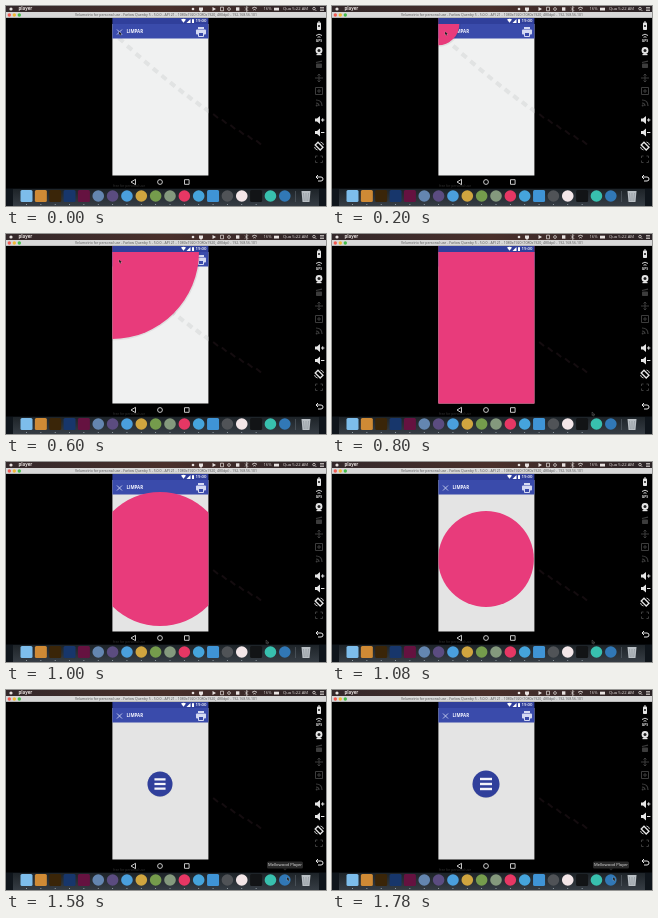
Recreate the animation shown at these times as an HTML page with a canvas. Size 320 by 200 pixels, loop 1.88 s.

```html
<!DOCTYPE html>
<html lang="pt">
<head>
<meta charset="utf-8">
<title>Circular reveal</title>
<style>
html, body { margin: 0; width: 100%; height: 100%; overflow: hidden; background: #000; }
canvas { display: block; width: 320px; height: 200px; }
</style>
</head>
<body>
<canvas id="stage" width="320" height="200"></canvas>
<script>
const g = document.getElementById('stage').getContext('2d');
const LOOP = 1880;
const STEPS = [0, 100, 200, 300, 400, 500, 600, 700, 800, 920, 1000, 1080, 1180,
  1260, 1380, 1480, 1580, 1680, 1780];
const PINK = '#e83b7b', BLUE = '#3a4bab', DARK_BLUE = '#303f9b';
const SCREEN = { x: 106.4, y: 12, w: 96, h: 157.4 };

// Radius keys: [time, radius]
const GROW = [[0, 0], [100, 5], [400, 54], [600, 87], [700, 130], [800, 182]];
const SHRINK = [[800, 182], [920, 86], [1000, 67], [1180, 24], [1260, 6.5], [1380, 0]];
const BUTTON = [[1260, 0], [1380, 2], [1480, 8], [1580, 12.5], [1680, 13.5]];

function along(keys, t) {
  if (t <= keys[0][0]) return keys[0][1];
  for (let i = 1; i < keys.length; i++) {
    const [a, u] = keys[i - 1], [b, v] = keys[i];
    if (t <= b) return u + (v - u) * (t - a) / (b - a);
  }
  return keys[keys.length - 1][1];
}
function rect(x, y, w, h, color) {
  g.fillStyle = color;
  g.fillRect(x, y, w, h);
}
function round(x, y, w, h, r, color) {
  g.fillStyle = color;
  g.beginPath();
  g.roundRect(x, y, w, h, r);
  g.fill();
}
function disc(x, y, r, color) {
  g.fillStyle = color;
  g.beginPath();
  g.arc(x, y, Math.max(0, r), 0, Math.PI * 2);
  g.fill();
}
function ring(x, y, r, color, width = 1) {
  g.strokeStyle = color;
  g.lineWidth = width;
  g.beginPath();
  g.arc(x, y, r, 0, Math.PI * 2);
  g.stroke();
}
function path(d, color, width = 1, dx = 0, dy = 0) {
  g.save();
  g.translate(dx, dy);
  g.strokeStyle = color;
  g.lineWidth = width;
  g.stroke(new Path2D(d));
  g.restore();
}
function shape(d, color, dx = 0, dy = 0) {
  g.save();
  g.translate(dx, dy);
  g.fillStyle = color;
  g.fill(new Path2D(d));
  g.restore();
}
function text(s, x, y, size, color, align = 'left', weight = 400) {
  g.font = `${weight} ${size}px "Open Sans", Roboto, sans-serif`;
  g.textAlign = align;
  g.textBaseline = 'middle';
  g.fillStyle = color;
  g.fillText(s, x, y);
}

function drawMenuBar() {
  const ink = '#e8e2e0';
  const fill = g.createLinearGradient(0, 0, 320, 0);
  fill.addColorStop(0, '#33282a');
  fill.addColorStop(.5, '#4a302b');
  fill.addColorStop(1, '#2a2326');
  rect(0, 0, 320, 6, fill);
  disc(5, 3, 1.6, ink);
  text('player', 12.5, 3, 4.4, ink, 'left', 700);
  disc(187, 3, 1.3, ink);
  rect(193, 1.5, 4, 3, ink);
  disc(195, 4.4, 1.2, ink);
  shape('M206.5 1l3.5 2-3.5 2z', ink);
  path('M214.5 1.2h3v3.6h-3z', ink, .7);
  ring(223, 3, 1.4, ink, .7);
  rect(230, 1.3, 3.4, 3.4, ink);
  path('M239 1.5l3 3-1.5 1v-5l1.5 1-3 3', ink, .6);
  path('M246 2.3q2.5-2 5 0M247.3 4q1.2-1 2.4 0', ink, .9);
  text('16%', 261.5, 3, 4, ink, 'center');
  rect(268, 1.7, 5, 2.8, ink);
  text('Qua 5:22 AM', 277, 3, 4.2, ink);
  ring(308, 2.6, 1.3, ink, .7);
  path('M309 3.6l1.3 1.3', ink, .7);
  path('M314 1.5h4M314 3h4M314 4.5h4', ink, .7);

  rect(0, 6, 320, 6, '#d8d8d8');
  rect(0, 11.5, 320, .5, '#999');
  ['#f45b54', '#f3b935', '#45bd4a'].forEach((c, i) => disc(3.3 + i * 5, 9, 1.7, c));
  text('Velumotrix for personal use - Farlow Quenby 5 - 5.0.0 - API 21 - 1080x1920 (1080x1920, 480dpi) - 192.168.56.101',
    160, 9, 3.5, '#555', 'center');
}

function drawSidebar() {
  const on = '#e6e6e6', off = '#3c3c3c';
  round(311, 16.5, 4, 7.5, .8, on);
  rect(312, 15.5, 2, 1, on);
  rect(312.2, 19, 1.6, 2, '#222');
  path('M310 29.5q3-2.6 6 0M311.5 31.3q1.5-1.2 3 0', on, .9);
  text('GPS', 313, 35, 3.4, on, 'center', 700);
  disc(313, 44.5, 3.4, on);
  disc(313, 44.5, 1.5, '#222');
  rect(310.5, 48, 5, 1.2, on);
  round(310, 57.5, 6, 4.5, .7, off);
  path('M310 56.5l6-1.3', off, 1.2);
  path('M313 68v8M309 72h8M311.5 69.5l1.5-1.5 1.5 1.5M311.5 74.5l1.5 1.5 1.5-1.5', off);
  path('M309.5 81.5h7v7h-7zM312 84h2v2h-2z', off);
  path('M310 94q6 0 6 6M310 97q3 0 3 3', off, 1.2);
  disc(310.7, 99.5, 1, off);
  for (const y of [114, 126.5]) {
    shape('M309 -1.5h2l3-2.5v8l-3-2.5h-2z', on, 0, y);
    path('M315 0h3.4', on, 1, 0, y);
  }
  path('M316.7 112.3v3.4', on, 1);
  path('M312 136.2l5 5-2.8 2.8-5-5z', on, 1.3);
  path('M314.5 136q2.5.5 3 3M311.5 144q-2.5-.5-3-3', on, .8);
  path('M309.5 152v-2h2M314.5 150h2v2M316.5 154.5v2h-2M311.5 156.5h-2v-2', off);
  path('M310 171h5q2 0 2 2t-2 2h-3M312 169l-2 2 2 2', on, 1);
}

function drawDock() {
  const fill = g.createLinearGradient(0, 183, 0, 200);
  fill.addColorStop(0, '#1d2328');
  fill.addColorStop(1, '#363d44');
  rect(0, 182.5, 320, 17.5, '#0f151b');
  rect(7, 183, 306, 17, fill);
  const icons = ['#7dbdeb', '#cf8a35', '#3a2508', '#17366b', '#651240', '#6486b0',
    '#5b4c80', '#4a9fdd', '#d0a53f', '#759c4c', '#84997d', '#e63764',
    '#45a4dc', '#3f94d6', '#505357', '#f3e6e8', '#121416', '#38c0ae', '#3178b6'];
  const squares = [0, 1, 2, 3, 4, 13, 16];
  icons.forEach((color, i) => {
    const x = 20.5 + i * 14.35;
    if (squares.includes(i)) round(x - 6, 184, 12, 12, 1.5, color);
    else disc(x, 190, 5.8, color);
    if (i < 17) disc(x, 198.6, .5, '#aeb9c0');
  });
  rect(289, 185, .6, 11, '#5a636b');
  shape('M295.5 185h9l-1 11h-7z', '#b9bfc4');
  path('M297.5 187l.8 8M300 187v8M302.5 187l-.8 8', '#858e95', .6);
}

// Faint arc of marks left along the pointer's way
function drawTrail(dark) {
  g.save();
  g.globalAlpha = .7;
  for (let i = dark ? 11 : 0; i < (dark ? 17 : 11); i++) {
    const x = 115 + i * 8.6, y = 34 + 8 * i - .1 * i * i;
    path('M-2.4-2l4.8 4', dark ? '#1c1115' : '#dcdddd', dark ? 2 : 4, x, y);
  }
  g.restore();
}

function drawToolbar() {
  rect(106, 18, 97, 14.5, BLUE);
  path('M111 23.5l5 5M116 23.5l-5 5', '#c9d0ee', .9);
  text('LIMPAR', 120.5, 25.7, 4.4, '#f3f4ff', 'left', 700);
  const paper = '#d5daf3';
  rect(192, 21, 6, 2, paper);
  round(190, 23.5, 10, 5, 1, paper);
  path('M192.5 26.5h5v4h-5z', paper, 1);
  rect(193, 27, 4, 3, BLUE);
}

function drawStatusBar() {
  rect(106, 12, 97, 6, DARK_BLUE);
  shape('M175 13.5q2.5-1.3 5 0l-2.5 3.3z', '#fff');
  shape('M184.5 13v4h-4z', '#fff');
  rect(186, 13.2, 2, 3.8, '#fff');
  text('19:00', 200.5, 15, 4.3, '#fff', 'right', 600);
}

function drawButton(t) {
  const r = along(BUTTON, t);
  if (!r) return;
  disc(154, 94.5, r, 'rgba(0,0,0,.13)');
  disc(154, 94, r, DARK_BLUE);
  const k = r / 13.5;
  for (const dy of [-5, 0, 5])
    rect(154 - 6 * k, 94 + (dy - 1.2) * k, 12 * k, 2.4 * k, '#f4f4fa');
}

function drawPhone(t) {
  g.save();
  g.beginPath();
  g.rect(SCREEN.x, SCREEN.y, SCREEN.w, SCREEN.h);
  g.clip();
  rect(106, 18, 97, 152, t < 800 ? '#f0f1f1' : '#e4e4e4');
  if (t < 800) drawTrail(false);
  drawToolbar();
  if (t < 800) {
    const r = along(GROW, t);
    if (r) ring(106, 18, r, 'rgba(0,0,0,.07)', 3);
    disc(106, 18, r, PINK);
  } else {
    disc(154, 97, along(SHRINK, t), PINK);
  }
  drawButton(t);
  drawStatusBar();
  g.restore();

  path('M129.5 173.3v5.4l-4.5-2.7z', '#ddd', .9);
  ring(154, 176, 2.4, '#ddd', .9);
  path('M178.5 173.7h4.6v4.6h-4.6z', '#ddd', .9);
  text('free for personal use', 107, 180, 3.3, '#343434');
}

function drawTooltip(label, x, width) {
  round(x - width / 2, 171.5, width, 7, 1.5, '#292929');
  shape('M-2 0h4l-2 2z', '#292929', x, 178.5);
  text(label, x, 175, 4.1, '#e5e5e5', 'center');
}

function drawPointer(t) {
  const arrow = 'M0 0v3.6l.9-.8.7 1.4.7-.4-.6-1.3h1.2z';
  let x = 113, y = 25.5;
  if (t >= 700) [x, y] = [260, 178];
  if (t >= 1180) [x, y] = [267, 186];
  if (t >= 1480) [x, y] = [281, 187];
  shape(arrow, '#111', x, y);
  path(arrow, 'rgba(255,255,255,.55)', .3, x, y);
}

function draw(now) {
  const clock = now % LOOP;
  const t = STEPS.filter(s => s <= clock).pop();
  rect(0, 0, 320, 200, '#000');
  drawTrail(true);
  drawMenuBar();
  drawSidebar();
  drawPhone(t);
  drawDock();
  if (t >= 1480) drawTooltip('Mellowood Player', 279, 36);
  else if (t >= 1180) drawTooltip('Zinbolter', 265, 22);
  drawPointer(t);
}

const start = performance.now();
function tick() {
  draw(performance.now() - start);
  requestAnimationFrame(tick);
}
tick();
</script>
</body>
</html>
```
